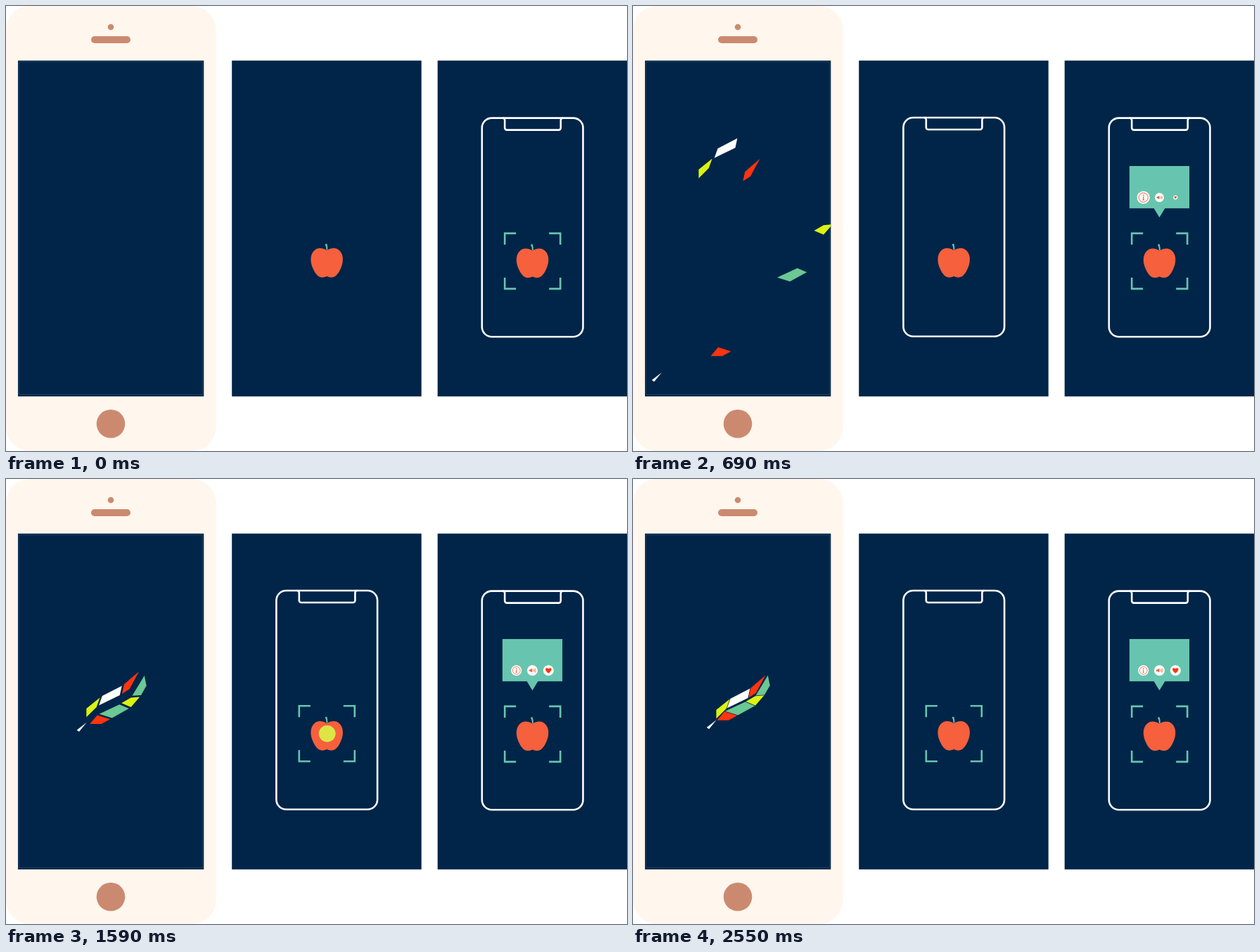
An HTML page with a canvas for the animation above (2700 ms loop, 883 by 634 pixels).

```html
<!DOCTYPE html>
<html lang="en">
<head>
<meta charset="utf-8">
<title>Feather splash and apple scan</title>
<style>
html, body { margin: 0; width: 883px; height: 634px; overflow: hidden; background: #fff; }
canvas { display: block; }
</style>
</head>
<body>
<canvas id="stage" width="883" height="634"></canvas>
<script>
const ctx = document.getElementById('stage').getContext('2d');
const LOOP = 2700, STEP = 30;
const NAVY = '#002548', CREAM = '#fff6ed', COPPER = '#cb8a70', MINT = '#67c5af';
const APPLE = '#f6603c', TAP = '#dde545', LIME = '#dcf20f', RED = '#ff3410', GREEN = '#6bc793';

const clamp = v => Math.max(0, Math.min(1, v));
const ramp = (t, a, b) => clamp((t - a) / (b - a));
const easeOut = p => 1 - (1 - p) * (1 - p);
const easeInOut = p => p < 0.5 ? 2 * p * p : 1 - 2 * (1 - p) * (1 - p);

// Monotone cubic through (xs, ys), flat at the last point
function curve(xs, ys) {
  const n = xs.length - 1;
  const slope = i => (ys[i + 1] - ys[i]) / (xs[i + 1] - xs[i]);
  const m = xs.map((_, i) => {
    if (i === n) return 0;
    if (i === 0) return slope(0);
    const a = slope(i - 1), b = slope(i);
    return a * b > 0 ? 2 * a * b / (a + b) : 0;
  });
  return x => {
    if (x <= xs[0]) return ys[0];
    if (x >= xs[n]) return ys[n];
    let i = 0;
    while (x > xs[i + 1]) i++;
    const h = xs[i + 1] - xs[i], u = (x - xs[i]) / h, v = 1 - u;
    return v * v * (1 + 2 * u) * ys[i] + u * u * (3 - 2 * u) * ys[i + 1]
      + h * u * v * (v * m[i] - u * m[i + 1]);
  };
}

// A blade flies in along its drift points, spreads around the feather, then settles.
// side: -1 above the spine, 1 below, 0 on it
function makeBlade(color, corners, side, drift) {
  const mid = [0, 1].map(k => corners.reduce((sum, p) => sum + p[k], 0) / corners.length);
  const spread = [0.1 * (mid[0] - 152) + 1.5 * side, 0.12 * (mid[1] - 320) + 3 * side];
  const times = [120, ...[330, 690, 1020].slice(-drift.length), 1590, 1920];
  const [dx, dy] = [0, 1].map(k => {
    const way = drift.map(p => p[k]);
    const start = way[0] + 3 * (way[0] - (way[1] || 0));
    return curve(times, [start, ...way, spread[k], 0]);
  });
  const inset = p => p.map((v, k) => mid[k] + (v - mid[k]) * 0.96);
  return { color, dx, dy, pts: corners.map(inset) };
}

// Neighbouring blades share the nodes of the inner and outer edge
function makeRow(side, inner, outer, blades) {
  return blades.map(([color, ...drift], i) =>
    makeBlade(color, [inner[i], inner[i + 1], outer[i + 1], outer[i]], side, drift));
}

const FEATHER = [
  ...makeRow(-1,
    [[118, 342], [133, 327], [164, 312], [175, 305]],
    [[118, 329], [138, 313], [167, 298], [189, 279]],
    [[LIME, [-79, -103], [-25, -96], [-17, -82]],
     ['#fff', [-77, -166], [-18, -110], [16, -147]],
     [RED, [54, -171], [-8, -62], [-4, -40]]]),
  ...makeRow(1,
    [[119, 344], [130, 331], [160, 317], [174, 309], [192, 279]],
    [[136, 344], [149, 337], [174, 323], [187, 308], [195, 294]],
    [[RED, [38, 220], [-9, 155], [6, 59]],
     [GREEN, [98, 156], [74, 56], [65, 94]],
     [LIME, [97, 3], [69, 9]],
     [GREEN, [93, -23]]]),
  makeBlade('#fff', [[104.5, 354], [119, 343], [108, 356.5]], 0, [[-78, 179], [-64, 164]])
];

function rect(x, y, w, h, r, color) {
  ctx.fillStyle = color;
  ctx.beginPath();
  ctx.roundRect(x, y, w, h, r);
  ctx.fill();
}

function disc(x, y, r, color) {
  ctx.fillStyle = color;
  ctx.beginPath();
  ctx.arc(x, y, r, 0, 2 * Math.PI);
  ctx.fill();
}

function arc(r, from, to, width) {
  ctx.strokeStyle = APPLE;
  ctx.lineWidth = width;
  ctx.beginPath();
  ctx.arc(0, 0, r, from, to);
  ctx.stroke();
}

function poly(pts, color) {
  ctx.fillStyle = color;
  ctx.beginPath();
  for (const [x, y] of pts) ctx.lineTo(x, y);
  ctx.closePath();
  ctx.fill();
}

function placed(x, y, scale, draw) {
  ctx.save();
  ctx.translate(x, y);
  ctx.scale(scale, scale);
  draw();
  ctx.restore();
}

function panel(x, w) {
  rect(x, 77.7, w, 478.5, 0, NAVY);
}

function rounded(start, corners, end, r) {
  const path = new Path2D();
  path.moveTo(...start);
  corners.forEach((c, i) => path.arcTo(...c, ...(corners[i + 1] || end), r));
  path.lineTo(...end);
  return path;
}

const box = { l: 384.4, r: 528.1, t: 159, b: 470.7 };
const FRAME = rounded([514, box.b],
  [[box.l, box.b], [box.l, box.t], [box.r, box.t], [box.r, box.b]], [514, box.b], 14);
const NOTCH = rounded([499.5, box.t],
  [[496.4, box.t], [496.4, 176], [416.8, 176], [416.8, box.t]], [413.7, box.t], 3);

function trimmed(path, length, p) {
  if (p <= 0) return;
  ctx.setLineDash(p < 1 ? [length * p, length * 2] : []);
  ctx.strokeStyle = '#fff';
  ctx.lineWidth = 2.6;
  ctx.stroke(path);
  ctx.setLineDash([]);
}

function drawPhone(frame, notch) {
  trimmed(FRAME, 888, frame);
  trimmed(NOTCH, 115, notch);
}

function drawApple() {
  placed(456.2, 365, 1, () => {
    ctx.fillStyle = APPLE;
    ctx.beginPath();
    for (const s of [-1, 1]) {
      ctx.moveTo(0, -17);
      ctx.bezierCurveTo(s * 6, -20.5, s * 13, -21.5, s * 17.5, -17);
      ctx.bezierCurveTo(s * 24.5, -11, s * 24, 1, s * 19, 10.5);
      ctx.bezierCurveTo(s * 14, 21, s * 8, 24, 0, 20);
      ctx.closePath();
    }
    ctx.fill('evenodd');
    ctx.fillStyle = MINT;
    ctx.beginPath();
    ctx.moveTo(-2.6, -25.5);
    ctx.lineTo(0, -26.5);
    ctx.quadraticCurveTo(1.4, -22, 1.2, -17.5);
    ctx.lineTo(-0.6, -17.5);
    ctx.quadraticCurveTo(-0.6, -22, -2.6, -25.5);
    ctx.fill();
  });
}

function drawBrackets(show) {
  placed(456.3, 362.8, 1.25 - 0.25 * show, () => {
    ctx.globalAlpha = show;
    ctx.strokeStyle = MINT;
    ctx.lineWidth = 2.6;
    ctx.beginPath();
    for (const sx of [-1, 1]) for (const sy of [-1, 1]) {
      ctx.moveTo(sx * 23.5, sy * 39.5);
      ctx.lineTo(sx * 39.5, sy * 39.5);
      ctx.lineTo(sx * 39.5, sy * 23.5);
    }
    ctx.stroke();
  });
}

function drawInfo() {
  arc(5.4, 0, 2 * Math.PI, 0.8);
  rect(-0.6, -3.2, 1.3, 1.3, 0, APPLE);
  rect(-0.5, -1.1, 1.1, 4.1, 0, APPLE);
  rect(-1.2, 2.5, 2.5, 0.7, 0, APPLE);
}

function drawSpeaker() {
  rect(-4.4, -1.3, 2, 2.6, 0, APPLE);
  poly([[-2.9, -1.3], [-0.1, -3], [-0.1, 3], [-2.9, 1.3]], APPLE);
  for (let i = 0; i < 3; i++) arc(1.7 + 1.5 * i, -0.7, 0.7, 0.7);
}

function drawHeart() {
  ctx.fillStyle = RED;
  ctx.beginPath();
  ctx.moveTo(0, 4);
  ctx.bezierCurveTo(-7, -1, -4, -6, 0, -2.4);
  ctx.bezierCurveTo(4, -6, 7, -1, 0, 4);
  ctx.fill();
}

function drawIcon(t, i, draw, scale = 1) {
  const age = t - 560 - 45 * i;
  const pop = 1.22 * ramp(age, 0, 120) - 0.22 * ramp(age, 130, 230);
  placed(725.7 + 22.8 * i, 272.8, pop * scale, () => {
    disc(0, 0, 7.5, '#fff');
    draw();
  });
}

function drawBubble(t) {
  const grow = easeOut(ramp(t, 120, 480));
  placed(748.5, 372, grow, () => rect(-42.6, -144, 85.2, 60.3, 0, MINT));
  const tip = 288 + 13.3 * ramp(t, 420, 570);
  if (tip > 288) poly([[740.5, 288], [756.5, 288], [748.5, tip]], MINT);
  const pulse = 1 + 0.72 * (ramp(t, 2040, 2100) - easeInOut(ramp(t, 2370, 2550)));
  drawIcon(t, 0, drawInfo);
  drawIcon(t, 2, drawHeart);
  drawIcon(t, 1, drawSpeaker, pulse);
}

function drawSplash(t) {
  rect(0, 0, 298.5, 634, 34, CREAM);
  disc(149, 30, 4.3, COPPER);
  rect(121, 43, 56, 10, 5, COPPER);
  disc(149, 595.3, 20.3, COPPER);
  panel(17, 264.3);
  ctx.strokeStyle = 'rgba(150,140,150,0.22)';
  ctx.lineWidth = 1;
  ctx.strokeRect(18.5, 79.5, 261, 474);
  ctx.save();
  ctx.beginPath();
  ctx.rect(17, 78, 264.3, 478);
  ctx.clip();
  for (const b of FEATHER) placed(b.dx(t), b.dy(t), 1, () => poly(b.pts, b.color));
  ctx.restore();
}

function drawScan(t) {
  panel(321.2, 269.5);
  drawPhone(easeInOut(ramp(t, 120, 620)), easeInOut(ramp(t, 120, 490)));
  drawBrackets(easeOut(ramp(t, 750, 930)));
  drawApple();
  ctx.globalAlpha = 1 - ramp(t, 1650, 1860);
  disc(456.7, 362.8, 13.4 * easeOut(ramp(t, 1410, 1680)), TAP);
  ctx.globalAlpha = 1;
}

function drawResult(t) {
  panel(613.7, 269.3);
  drawBubble(t);
  placed(292.4, 0.6, 1, () => {
    drawPhone(1, 1);
    drawBrackets(1);
    drawApple();
  });
}

function render(now) {
  const t = Math.floor(Math.max(0, now - begin) % LOOP / STEP) * STEP;
  ctx.fillStyle = '#fff';
  ctx.fillRect(0, 0, 883, 634);
  drawSplash(t);
  drawScan(t);
  drawResult(t);
  requestAnimationFrame(render);
}

const begin = performance.now();
render(begin);
</script>
</body>
</html>
```
